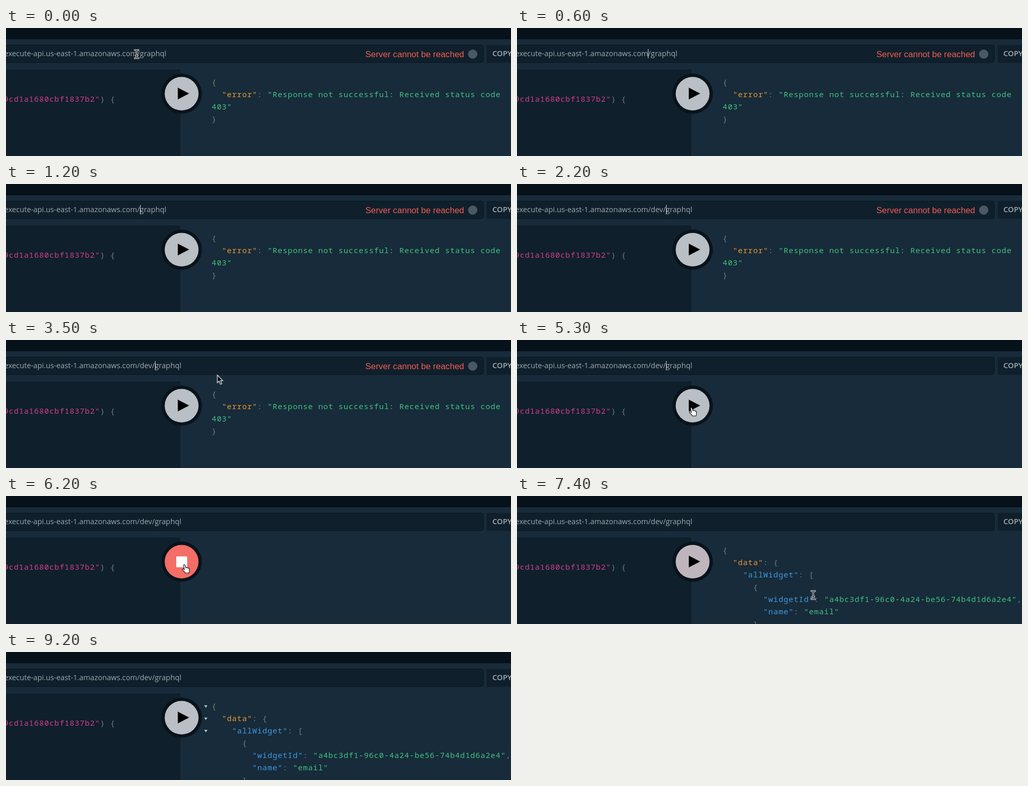
Write an HTML page that moves like this. It is 976 px wide and 250 px high and loops after 9500 ms.

```html
<!DOCTYPE html>
<html lang="en">
<head>
<meta charset="utf-8">
<title>GraphQL request</title>
<style>
  html, body { margin: 0; width: 100%; height: 100%; overflow: hidden; background: #172b3a; }
  svg { position: absolute; left: 0; top: 0; display: block; }

  /* every part shares one 9.5 s loop */
  .url i, .caret, .on { animation: 9.5s step-end infinite; }

  .url {
    position: absolute; top: 40px; white-space: pre;
    font: 14.3px/20px "Open Sans", sans-serif; color: #a1a8ad;
  }
  .host { right: calc(100% - 258.6px); }
  .path { left: 258.6px; }
  .url i { font-style: normal; font-size: 0; }
  .caret {
    position: relative; display: inline-block; width: 0; height: 0;
  }
  .caret::after {
    content: ""; position: absolute; left: 0; top: -14px;
    width: 1px; height: 18px; background: #d3d8dc;
  }
  .url .d { animation-name: type-d; }
  .url .e { animation-name: type-e; }
  .url .v { animation-name: type-v; }
  .url .s { animation-name: type-s; }
  .caret { animation-name: blink; }
  @keyframes type-d { 0% { font-size: 0 } 17.89%, 100% { font-size: 14.3px } }
  @keyframes type-e { 0% { font-size: 0 } 19.99%, 100% { font-size: 14.3px } }
  @keyframes type-v { 0% { font-size: 0 } 21.05%, 100% { font-size: 14.3px } }
  @keyframes type-s { 0% { font-size: 0 } 23.15%, 100% { font-size: 14.3px } }
  @keyframes blink {
    0% { opacity: 0; transform: translateX(-6px) }
    6.31% { opacity: 1; transform: translateX(-6px) }
    10.52% { opacity: 1; transform: none }
    15.78% { opacity: 0; transform: none }
    17.89% { opacity: 1 }
    28.42% { opacity: 0 }
    33.68% { opacity: 1 }
    38.94% { opacity: 0 }
    44.21% { opacity: 1 }
    49.47% { opacity: 0 }
    54.73% { opacity: 1 }
    57.89%, 100% { opacity: 0; transform: none }
  }

  .code { font: 15px "Noto Sans Mono", "DejaVu Sans Mono", monospace; letter-spacing: .8px; fill: #6f7d86; }
  .top { fill: #ea9633; }
  .key { fill: #3f9ae0; }
  .str { fill: #42c080; }
  .arg { fill: #d23c8d; }
  .copy { font: 600 14.4px "Open Sans", sans-serif; fill: #a3abb1; }
  .warn { font: 16.6px "Liberation Sans", Arial, sans-serif; fill: #f25c54; }

  .error { animation-name: error; }
  .data { animation-name: data; }
  .folds { animation-name: folds; }
  .play { animation-name: play; }
  .stop { animation-name: stop; }
  @keyframes error { 0% { opacity: 1 } 42.1%, 100% { opacity: 0 } }
  @keyframes data { 0% { opacity: 0 } 77.89%, 100% { opacity: 1 } }
  @keyframes folds { 0% { opacity: 0 } 83.15%, 100% { opacity: 1 } }
  @keyframes play { 0% { opacity: 1 } 57.89% { opacity: 0 } 77.89%, 100% { opacity: 1 } }
  @keyframes stop { 0% { opacity: 0 } 57.89% { opacity: 1 } 77.89%, 100% { opacity: 0 } }

  .disc { animation: disc 9.5s linear infinite; }
  @keyframes disc {
    0%, 57.89% { fill: #b9bfc4 }
    59.99%, 77.88% { fill: #f46d66 }
    77.89% { fill: #bfb6bd }
    78.94%, 100% { fill: #b9bfc4 }
  }

  .mouse { animation: mouse 9.5s ease-in-out infinite; }
  @keyframes mouse {
    0%, 6.31% { transform: translate(252.5px, 51px) }
    6.32%, 30.52% { transform: translate(262px, 51px) }
    36.84%, 40% { transform: translate(408.5px, 68.5px) }
    44.21%, 46.31% { transform: translate(19px, 44px) }
    47.36% { transform: translate(28.5px, 44px) }
    56.84%, 65.26% { transform: translate(344.5px, 134.5px) }
    73.68% { transform: translate(574px, 200px) }
    75.78%, 77.89% { transform: translate(572.5px, 193.5px) }
    86.31%, 100% { transform: translate(566px, 270px) }
  }
  .beam { animation-name: beam; }
  .arrow { animation-name: arrow; }
  .hand { animation-name: hand; }
  @keyframes beam {
    0% { opacity: 1 } 6.31% { opacity: 0 }
    30.52% { opacity: 1 } 35.78% { opacity: 0 }
    41.05% { opacity: 1 } 54.73% { opacity: 0 }
    67.36% { opacity: 1 } 86.31%, 100% { opacity: 0 }
  }
  @keyframes arrow { 0% { opacity: 0 } 35.78% { opacity: 1 } 41.05%, 100% { opacity: 0 } }
  @keyframes hand { 0% { opacity: 0 } 54.73% { opacity: 1 } 67.36%, 100% { opacity: 0 } }
</style>
</head>
<body>
<svg width="976" height="250" viewBox="0 0 976 250">
  <rect width="976" height="250" fill="#172b3a"/>
  <rect width="976" height="22" fill="#07111a"/>
  <rect x="-10" y="33.5" width="932.5" height="34" rx="4" fill="#0f202c" stroke="#09141c"/>
  <rect x="929" y="33" width="60" height="35" rx="2" fill="#0f202c"/>
  <text class="copy" x="940" y="55">COPY</text>
  <rect y="81" width="337" height="169" fill="#0f202c"/>

  <text class="code" x="-4.4" y="144"><tspan class="arg">9cd1a1680cbf1837b2"</tspan>) {</text>

  <g class="on error">
    <text class="warn" x="694.4" y="56.5">Server cannot be reached</text>
    <circle cx="902" cy="51" r="9" fill="#4a5963"/>
    <g class="code">
      <text x="397.6" y="111">{</text>
      <text x="417.2" y="135"><tspan class="top">"error"</tspan>: <tspan class="str">"Response not successful: Received status code</tspan></text>
      <text class="str" x="397.6" y="159">403"</text>
      <text x="397.6" y="183">}</text>
    </g>
  </g>

  <g class="on data code">
    <text x="397.6" y="111">{</text>
    <text x="417.2" y="135"><tspan class="top">"data"</tspan>: {</text>
    <text x="436.8" y="159"><tspan class="key">"allWidget"</tspan>: [</text>
    <text x="456.4" y="183">{</text>
    <text x="476" y="207"><tspan class="key">"widgetId"</tspan>: <tspan class="str">"a4bc3df1-96c0-4a24-be56-74b4d1d6a2e4"</tspan>,</text>
    <text x="476" y="231"><tspan class="key">"name"</tspan>: <tspan class="str">"email"</tspan></text>
    <text x="456.4" y="255">}</text>
  </g>
  <path class="on folds" fill="#b4bcc2" d="M383 104h6.4l-3.2 5zM383 128h6.4l-3.2 5zM383 152h6.4l-3.2 5z"/>

  <circle cx="339.4" cy="128.3" r="39.2" fill="#08131b"/>
  <circle class="disc" cx="339.4" cy="128.3" r="32.7"/>
  <path class="on play" d="M332 116.5L354 128L332 139.5z"/>
  <rect class="on stop" x="329" y="118" width="21.2" height="21.2" rx="1" fill="#fff"/>
</svg>

<div class="url host">execute-api.us-east-1.amazonaws.com/</div>
<div class="url path"><i class="d">d</i><i class="e">e</i><i class="v">v</i><i class="s">/</i><span class="caret"></span>graphql</div>

<svg width="976" height="250" viewBox="0 0 976 250">
  <defs>
    <path id="ibeam" d="M-3.6 -8Q0 -8 0 -5.5Q0 -8 3.6 -8M0 -5.5V5.5M-3.6 8Q0 8 0 5.5Q0 8 3.6 8M-2 3H2"/>
  </defs>
  <g class="mouse">
    <g class="on beam" fill="none" stroke-linecap="round">
      <use href="#ibeam" stroke="#fff" stroke-width="3"/>
      <use href="#ibeam" stroke="#000" stroke-width="1.2"/>
    </g>
    <path class="on arrow" stroke="#fff" stroke-width="1.2" d="M0 0V14.8L3.4 11.7L6 18L8.7 16.9L6.1 10.8H10.4z"/>
    <path class="on hand" fill="#fff" stroke="#000" stroke-width="1.1" stroke-linejoin="round"
      d="M-1.6 1Q-1.3 -.6 .2 -.4Q1.2 -.2 1.6 1.2L2.8 5.4Q4.2 4.2 5.2 5.8Q6.6 4.8 7.5 6.5Q9.4 6 9.8 8.4Q10.4 12 8.8 16H2.2Q1 13.6 -1 12.2Q-3.6 10.2 -3.8 9Q-3.4 7.4 -1.6 8.2L.2 9.4z"/>
  </g>
</svg>
</body>
</html>
```
